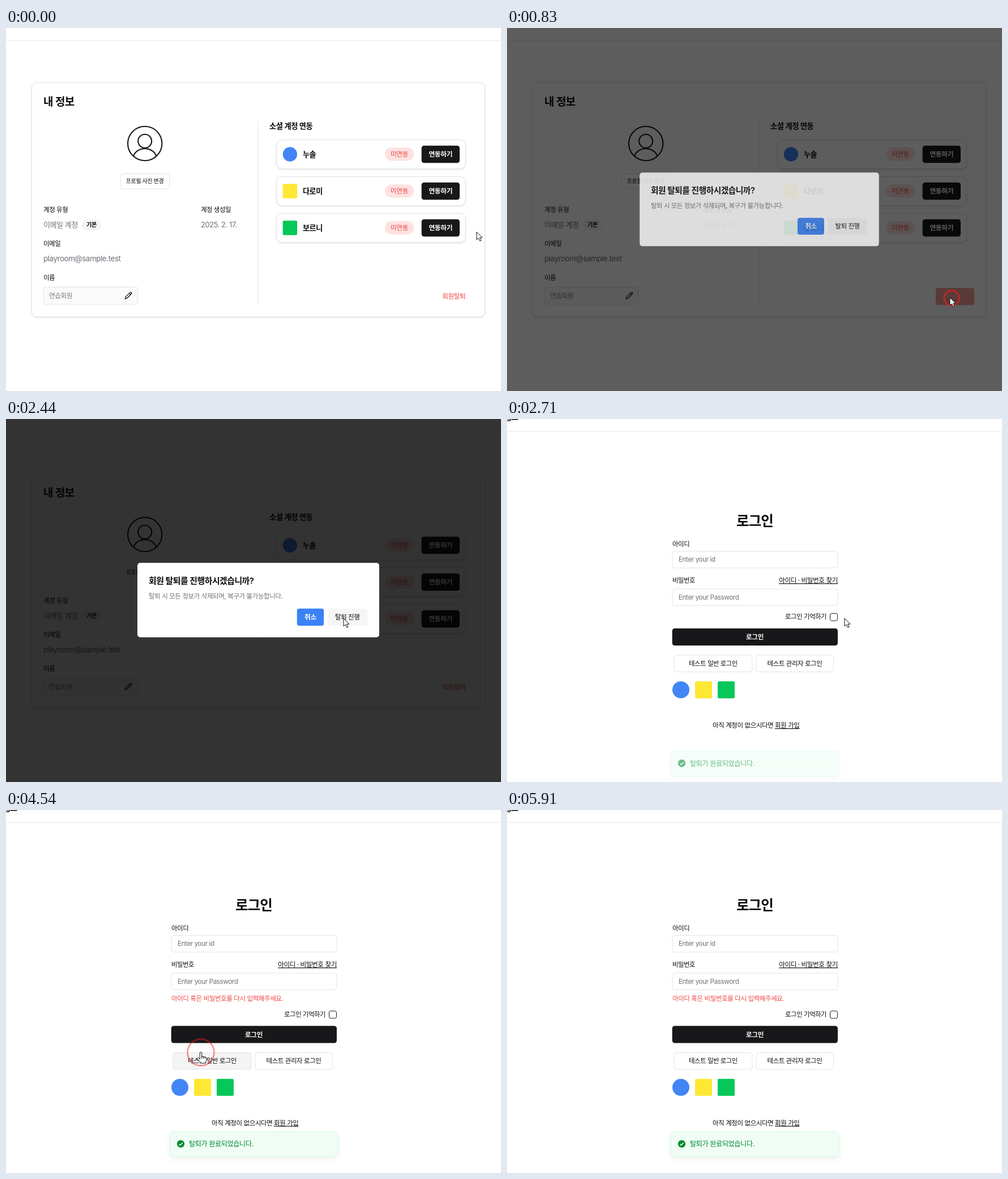
An HTML page that plays this animation: 874 by 641 pixels, repeating every 6.15 s.

```html
<!DOCTYPE html>
<html lang="ko">
<head>
<meta charset="utf-8">
<style>
  html, body { margin: 0; width: 100%; height: 100%; overflow: hidden; background: #fff; }
  svg { display: block; width: 874px; height: 641px; }
  text {
    font-family: Inter, "Noto Sans CJK KR", "Noto Sans CJK", sans-serif;
    letter-spacing: -.035em; white-space: pre;
  }
  .card { filter: drop-shadow(0 1px 1.5px rgba(0,0,0,.13)); }
  .toast { filter: drop-shadow(0 4px 5px rgba(0,0,0,.06)); }
</style>
</head>
<body>
<svg id="stage" viewBox="0 0 874 641" xmlns="http://www.w3.org/2000/svg"></svg>
<script>
const LOOP = 6150;
const INK = '#0a0a0a', DARK = '#18181b', GRAY = '#71717a', LINE = '#e4e4e7', RED = '#ef4444';

// Text is placed by its vertical centre.
const text = (x, y, size, str, { fill = INK, weight = 500, anchor = 'start', extra = '' } = {}) =>
  `<text x="${x}" y="${y + size * .36}" font-size="${size}" fill="${fill}" font-weight="${weight}" text-anchor="${anchor}" ${extra}>${str}</text>`;
const mid = (x, y, size, str, opts) => text(x, y, size, str, { ...opts, anchor: 'middle' });
const box = (x1, y1, x2, y2, r, fill, stroke = 'none', extra = '') =>
  `<rect x="${x1}" y="${y1}" width="${x2 - x1}" height="${y2 - y1}" rx="${r}" fill="${fill}" stroke="${stroke}" ${extra}/>`;
const group = (id, body) => `<g id="${id}">${body}</g>`;
const badges = (x, y, size, gap) => [0, 1, 2].map(i => badge(i, x + i * gap, y, size)).join('');
const badge = (i, x, y, size) => i === 0
  ? `<circle cx="${x + size / 2}" cy="${y + size / 2}" r="${size / 2}" fill="#4285f4"/>`
  : box(x, y, x + size, y + size, 2, i === 1 ? '#fee833' : '#06c75a');

const socialRow = (name, i) => {
  const y = 223 + i * 65;
  return box(478, y - 25.5, 811, y + 25.5, 9, '#fff', LINE, 'class="card"')
    + badge(i, 488.7, y - 12.7, 25.4)
    + text(524, y, 13.1, name, { weight: 600 })
    + box(669, y - 12, 720.5, y + 11.5, 11.7, '#fee2e2')
    + mid(694.5, y, 11.7, '미연동', { fill: RED })
    + box(733.7, y - 15.3, 801, y + 15.2, 4.5, DARK)
    + mid(767.3, y, 11.8, '연동하기', { fill: '#fff', weight: 600 });
};

const profile = group('profile',
  box(45.5, 96.5, 845.5, 510, 9, '#fff', LINE, 'class="card"')
  + text(66, 130, 19, '내 정보', { weight: 600 })
  + `<path d="M445 164V489" stroke="${LINE}"/>
     <g fill="none" stroke="${DARK}" stroke-width="2.1">
       <circle cx="245.2" cy="204" r="30.2"/><circle cx="245.2" cy="199.8" r="12"/>
       <path d="M225.2 226.7A20.3 16.5 0 0 1 265.2 226.7"/>
     </g>`
  + box(202, 257.5, 288.5, 284, 4, '#fff', LINE) + mid(245, 270.5, 10, '프로필 사진 변경')
  + text(66, 321, 11.5, '계정 유형')
  + text(66, 347, 13, '이메일 계정', { fill: GRAY, weight: 400 })
  + box(133.5, 338, 168.5, 356.5, 9, '#f4f4f5') + mid(151, 347.3, 10.1, '기본', { weight: 600 })
  + text(344, 321, 11.4, '계정 생성일')
  + text(344, 347, 13, '2025. 2. 17.', { fill: GRAY, weight: 400 })
  + text(66, 381, 11.4, '이메일')
  + text(66, 407, 13.5, 'playroom@sample.test', { fill: GRAY, weight: 400 })
  + text(66, 441, 11.4, '이름')
  + box(66, 457.5, 232.5, 488, 4, '#fafafa', LINE)
  + text(76, 472.5, 11.6, '연습회원', { fill: '#7c7c84', weight: 400 })
  + `<path transform="translate(209 465.5) scale(.58)" fill="none" stroke="${INK}" stroke-width="2.2" stroke-linejoin="round"
       d="M21.2 6.8a2.8 2.8 0 0 0-4-4L3.8 16.2 2 22l5.8-1.8ZM15 5l4 4"/>`
  + text(465, 173.5, 13.3, '소셜 계정 연동', { weight: 600 })
  + ['누솔', '다로미', '보르니'].map(socialRow).join('')
  + box(757, 459, 825, 489.2, 4.5, RED, 'none', 'id="leaveHover"')
  + mid(790.7, 474, 11.6, '회원탈퇴', { fill: RED, weight: 400, extra: 'id="leaveText"' }));

const dialog = group('dialog',
  box(232, 254, 659, 385.5, 5, '#fff')
  + text(252, 286, 14.9, '회원 탈퇴를 진행하시겠습니까?', { weight: 600 })
  + text(252, 313.3, 11.5, '탈퇴 시 모든 정보가 삭제되며, 복구가 불가능합니다.', { fill: GRAY, weight: 400 })
  + box(513.8, 334.8, 561.2, 365, 4, '#3b82f6') + mid(537.5, 350, 11.8, '취소', { fill: '#fff', weight: 600 })
  + box(568, 335, 638, 365, 4, '#f6f6f7') + mid(602.7, 350, 11.5, '탈퇴 진행'));

const field = (y, hint) => box(292, y - 14.7, 584, y + 14.7, 4, '#fff', LINE)
  + text(303, y, 11.7, hint, { fill: GRAY, weight: 400 });
const underline = 'text-decoration="underline"';

const login = group('login',
  text(-1, -3.8, 14, 'g스', { weight: 600 })
  + group('upper',
    mid(437.5, 180.2, 24.5, '로그인', { weight: 700 })
    + text(292, 220.5, 11.4, '아이디') + field(248.2, 'Enter your id')
    + text(292, 285, 11.3, '비밀번호')
    + text(584, 285, 11.6, '아이디 · 비밀번호 찾기', { weight: 400, anchor: 'end', extra: underline })
    + field(314.8, 'Enter your Password'))
  + text(292, 333, 11.5, '아이디 혹은 비밀번호를 다시 입력해주세요.', { fill: RED, weight: 400, extra: 'id="error"' })
  + group('lower',
    text(491, 349.3, 11.4, '로그인 기억하기')
    + box(570.5, 343.3, 583.5, 356.3, 3, '#fff', DARK)
    + box(291.7, 369.7, 584, 400, 4.5, DARK) + mid(437.5, 385, 11.6, '로그인', { fill: '#fff', weight: 600 })
    + box(295, 417, 433, 446.5, 4, '#fff', LINE, 'id="testButton"') + mid(364, 431.7, 11.4, '테스트 일반 로그인')
    + box(440, 417, 576.5, 446.5, 4, '#fff', LINE) + mid(508, 431.7, 11.5, '테스트 관리자 로그인')
    + badges(292, 463.2, 30, 40)
    + text(363, 541, 11.5, '아직 계정이 없으시다면', { weight: 400 })
    + text(473, 541, 11.5, '회원 가입', { weight: 400, extra: underline })));

const toast = group('toast',
  box(289.5, 568, 586, 612, 6, '#effdf5', '#d3fae3', 'class="toast"')
  + `<circle cx="308.5" cy="589.5" r="6.6" fill="#008a2e"/>
     <path d="M305.5 589.7l2.2 2.2 4-4.3" fill="none" stroke="#fff" stroke-width="1.4"/>`
  + text(323, 590, 12.2, '탈퇴가 완료되었습니다.', { fill: '#008a2e' }));

const pointers = group('pointer', `
  <g fill="#fff" stroke="#111" stroke-linejoin="round">
    <path id="arrow" d="M0 0V14L3.3 11 5.7 16.2 8 15.2 5.7 10.2H10Z"/>
    <g id="hand">
      <path d="M-1.7 12V1.2a1.7 1.7 0 0 1 3.4 0V7L8 8.3q2 .5 2 2.5V14L8.5 17v2H-.5V17.5L-6 11.5q-.5-2 1.5-2.2Z"/>
      <path d="M1.7 7v4M4.4 7.8v3.2M7.1 8.3v3"/>
    </g>
  </g>`);

document.getElementById('stage').innerHTML =
  `<path d="M0 22H874" stroke="${LINE}"/>` + profile + login + toast
  + '<rect id="shade" width="874" height="641"/>' + dialog
  + '<circle id="ring" fill="none" stroke="#ef2020" stroke-width="2.4"/>' + pointers;

const el = Object.fromEntries([...document.querySelectorAll('[id]')].map(e => [e.id, e]));
const set = (name, attrs) => { for (const k in attrs) el[name].setAttribute(k, attrs[k]); };
const show = (name, on) => set(name, { visibility: on ? 'visible' : 'hidden' });
const ramp = (t, start, length) => Math.min(1, Math.max(0, (t - start) / length));
const easeOut = p => 1 - (1 - p) ** 2;
const between = (t, a, b) => t >= a && t < b;

// Pointer stops: time, x, y
const path = [
  [30, 831, 360], [250, 806, 420], [430, 784, 486], [630, 782, 476],
  [1260, 782, 476], [1330, 716, 460], [1390, 663, 435], [1440, 622, 400], [1500, 596, 352],
  [3200, 596, 352], [3340, 402, 387], [3480, 344, 428],
  [5480, 344, 428], [5620, 520, 260], [5760, 720, 60], [5890, 775, -13], [5910, 775, -40],
];
const clicks = [[690, 785, 477], [1780, 596, 352], [4250, 344, 428]];

function pointerAt(t) {
  const i = path.findIndex(stop => stop[0] > t);
  if (i === 0) return path[0].slice(1);
  if (i < 0) return path.at(-1).slice(1);
  const [t0, x0, y0] = path[i - 1], [t1, x1, y1] = path[i];
  const p = (t - t0) / (t1 - t0);
  return [x0 + (x1 - x0) * p, y0 + (y1 - y0) * p];
}

function draw(t) {
  const onLogin = t >= 2570, failed = t >= 4400;
  show('profile', t < 2470);
  show('login', onLogin);

  const hover = ramp(t, 370, 150) * (1 - ramp(t, 760, 150));
  set('leaveHover', { opacity: hover });
  set('leaveText', { fill: `rgb(${239 + 16 * hover},${68 + 187 * hover},${68 + 187 * hover})` });

  const open = t < 2470 ? easeOut(ramp(t, 722, 200)) : 0;
  set('shade', { opacity: .8 * open });
  set('dialog', {
    opacity: open,
    transform: `translate(445.5 ${319.75 + 2.6 * (1 - open)}) scale(${.95 + .05 * open}) translate(-445.5 -319.75)`,
  });

  set('upper', { transform: `translate(0 ${failed ? -12 : 0})` });
  set('lower', { transform: `translate(0 ${failed ? 11.6 : 0})` });
  set('error', { opacity: +failed });
  set('testButton', { fill: between(t, 3420, 5500) ? '#f4f4f5' : '#fff' });

  const rise = easeOut(ramp(t, 2570, 400));
  set('toast', { opacity: rise, transform: `translate(0 ${44 * (1 - rise)})` });

  const click = clicks.find(([start]) => between(t, start, start + 600));
  show('ring', click);
  if (click) {
    const p = (t - click[0]) / 600;
    set('ring', { cx: click[1], cy: click[2], r: 32 * easeOut(p), opacity: 1 - p });
  }

  const hand = between(t, 370, 722) || between(t, 1480, 2300) || between(t, 3270, 5540);
  show('hand', hand);
  show('arrow', !hand);
  set('pointer', { transform: `translate(${pointerAt(t)})` });
}

function tick() {
  draw(performance.now() % LOOP);
  requestAnimationFrame(tick);
}
tick();
</script>
</body>
</html>
```
